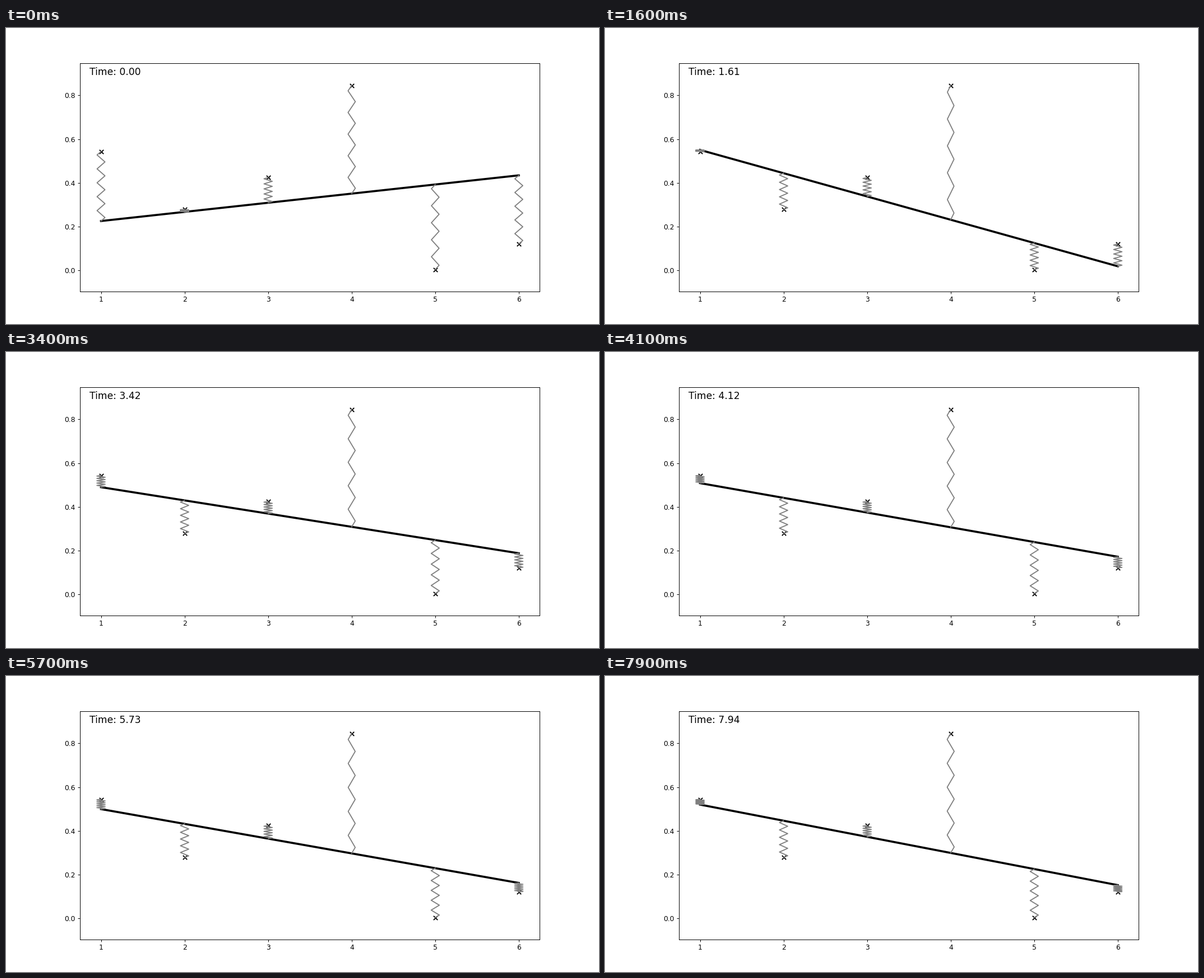
A matplotlib script for the animation above (8 s loop, 1058 by 529 pixels).

```python
import numpy as np
import matplotlib.pyplot as plt
from matplotlib.animation import FuncAnimation

FRAMES = 80
STEP = 20 / 199  # simulated seconds per frame
NODES, WIDTH = 10, 0.1

xs = np.arange(1, 7)
ys = np.random.RandomState(100).rand(6)

# Turning points of the rod: frame, height at left end, height at right end
SWING = np.array([
    (0, 0.2260, 0.4345),
    (16, 0.5505, 0.0195),
    (27, 0.4715, 0.2045),
    (41, 0.5085, 0.1725),
    (49, 0.4855, 0.1535),
    (65, 0.5135, 0.1715),
    (79, 0.5200, 0.1525),
])


def rod_ends(i):
    """Heights of both rod ends, eased from one turning point to the next."""
    k = min(np.searchsorted(SWING[:, 0], i, side="right"), len(SWING) - 1)
    a, b = SWING[k - 1], SWING[k]
    u = (i - a[0]) / (b[0] - a[0])
    u = u * u * (3 - 2 * u)
    return a[1:] + (b[1:] - a[1:]) * u


def zigzag(x, y0, y1):
    """Vertical spring of constant wire length from (x, y0) to (x, y1)."""
    n = np.arange(1, NODES + 1)
    length = y1 - y0
    half = np.sqrt(max(0, WIDTH**2 - (length / NODES) ** 2)) / 2
    side = -np.sign(length) * half * (-1.0) ** n
    px = np.concatenate(([x], x + side, [x]))
    py = np.concatenate(([y0], y0 + length * (2 * n - 1) / (2 * NODES), [y1]))
    return px, py


fig, ax = plt.subplots(figsize=(12, 6), dpi=1058 / 12)
ax.set_xlim(0.75, 6.25)
ax.set_ylim(ys.min() - 0.1, ys.max() + 0.1)

ax.scatter(xs, ys, marker="x", c="k")
rod, = ax.plot([], [], "k", lw=3)
springs = [ax.plot([], [], color="gray", lw=1.5)[0] for _ in xs]
clock = ax.text(0.02, 0.95, "", fontsize=14, transform=ax.transAxes)


def draw(i):
    left, right = rod_ends(i)
    rod.set_data([1, 6], [left, right])
    for spring, x, y in zip(springs, xs, ys):
        spring.set_data(*zigzag(x, y, left + (right - left) * (x - 1) / 5))
    clock.set_text(f"Time: {i * STEP:.2f}")
    return [rod, *springs, clock]


anim = FuncAnimation(fig, draw, frames=FRAMES, interval=100,
                     init_func=lambda: draw(0), repeat=True, repeat_delay=0)
plt.show()
```
